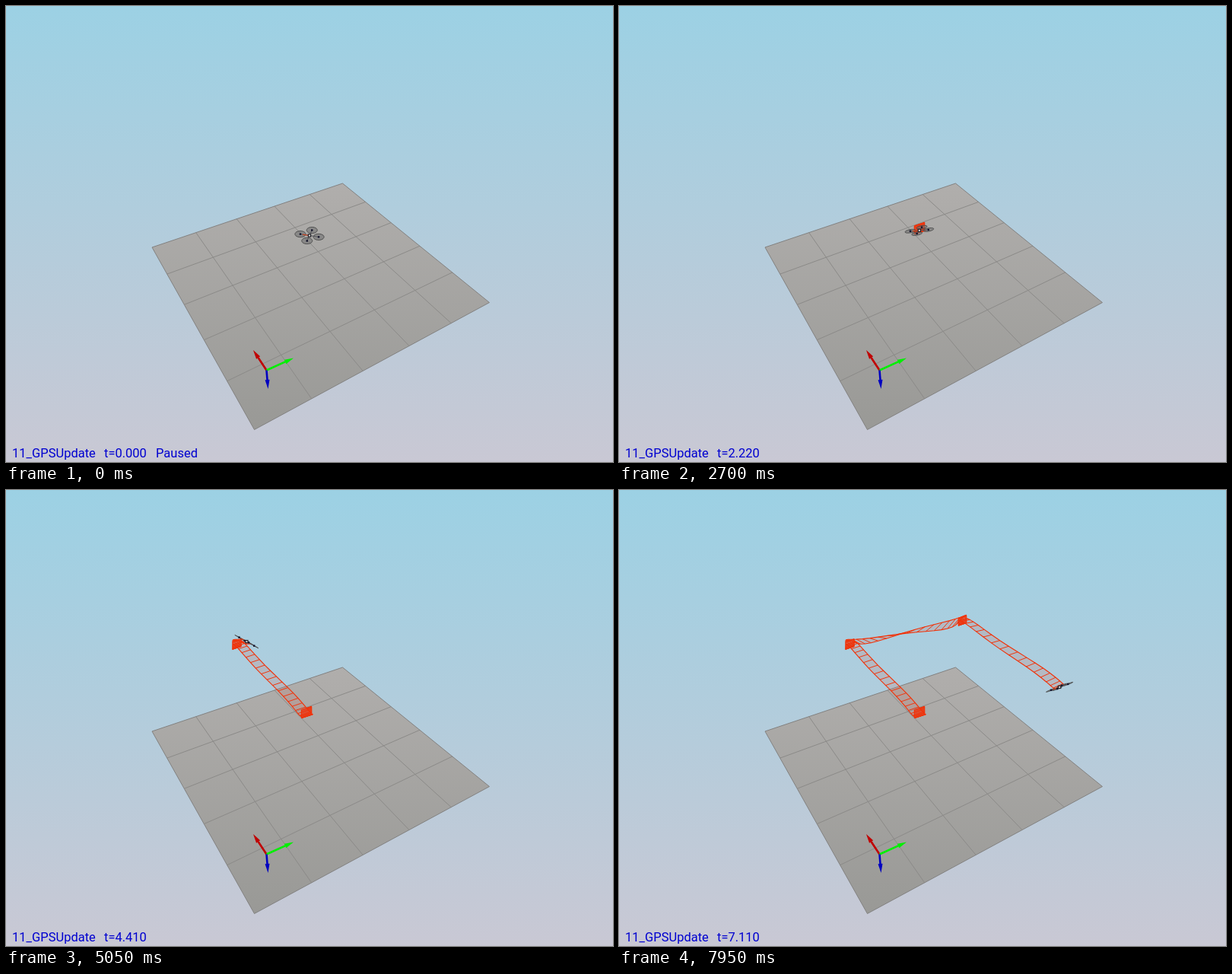
An HTML page with a canvas for the animation above (8 s loop, 798x599 px).

```html
<!DOCTYPE html>
<html lang="en">
<head>
<meta charset="utf-8">
<title>Quadrotor simulation</title>
<style>
html, body { margin: 0; width: 100%; height: 100%; overflow: hidden; }
canvas, svg { position: absolute; left: 0; top: 0; width: 798px; height: 599px; }
text { font: 400 16.5px Roboto, "Liberation Sans", sans-serif; fill: #0000d0; }
</style>
</head>
<body>
<canvas id="stage" width="798" height="599"></canvas>
<svg viewBox="0 0 798 599">
  <text x="8" y="593">11_GPSUpdate</text>
  <text x="129" y="593" id="clock">t=0.000</text>
  <text x="197" y="593" id="paused">Paused</text>
</svg>
<script>
const ctx = document.getElementById('stage').getContext('2d');
const clock = document.getElementById('clock');
const paused = document.getElementById('paused');

const LOOP = 8000, PAUSE = 300, SLOT = 50;
const RATE = 0.00093, TICK = 0.06, HALF_TICK_AT = 2850;
const TRAIL_START = 1.02, RUNG = 0.05;
const RED = '#f23006';

// Flight plan in simulated seconds; depth is the ground distance away from the camera
const home = { x: 398.5, y: 296 };
const legs = [
  { start: 0.56, time: 0.84, x: 394.5, y: 291, depth: 0 },
  { start: 2.16, time: 1.12, x: 303, y: 202, depth: 155 },
  { start: 4.16, time: 1.07, x: 451, y: 171, depth: 146 },
  { start: 6.20, time: 1.02, x: 580, y: 254.5, depth: -165 },
];
const BOB = 5, BOB_PERIOD = 1.186;
const LEAN = 0.0008;

const ease = s => s * s * s * (10 - 15 * s + 6 * s * s);
const easeAccel = s => 60 * s * (1 - s) * (1 - 2 * s);

// Screen position and both rotor arms; the body leans along its acceleration
function pose(t) {
  let { x, y } = home, leanX = 0, leanDepth = 0, hover = 1;
  for (const leg of legs) {
    const s = Math.min(1, Math.max(0, (t - leg.start) / leg.time));
    const p = ease(s), dx = leg.x - x, push = LEAN * easeAccel(s);
    if (s === 0) break;
    leanX += push * dx;
    leanDepth += push * leg.depth;
    x += dx * p;
    y += (leg.y - y) * p;
    hover = leg.depth ? 1 - 4 * p * (1 - p) : 1;
  }
  y += BOB * hover * Math.cos(2 * Math.PI * t / BOB_PERIOD);
  const scale = 0.82 + (y - 200) / 550;
  const arm = (right, away) => [
    scale * 12.4 * right,
    scale * (-7.2 * away + 10.1 * (right * leanX + away * leanDepth))];
  return { x, y, a: arm(-0.97, 0.26), b: arm(0.26, 0.97) };
}

function wing(t) {
  const { x, y, a, b } = pose(t);
  const hx = (b[0] - a[0]) * 0.45, hy = (b[1] - a[1]) * 0.45;
  return [[x - hx, y - hy], [x + hx, y + hy]];
}

// Perspective map from the unit square to the floor corners
const corners = [[326, 556], [635, 389], [442, 232.5], [191.5, 316.5]];
const floorPoint = (([x0, y0], [x1, y1], [x2, y2], [x3, y3]) => {
  const dx1 = x1 - x2, dx2 = x3 - x2, sx = x0 - x1 + x2 - x3;
  const dy1 = y1 - y2, dy2 = y3 - y2, sy = y0 - y1 + y2 - y3;
  const den = dx1 * dy2 - dy1 * dx2;
  const g = (sx * dy2 - sy * dx2) / den, h = (dx1 * sy - dy1 * sx) / den;
  return (u, v) => {
    const w = g * u + h * v + 1;
    return [((x1 - x0 + g * x1) * u + (x3 - x0 + h * x3) * v + x0) / w,
            ((y1 - y0 + g * y1) * u + (y3 - y0 + h * y3) * v + y0) / w];
  };
})(...corners);

function trace(points, close) {
  ctx.beginPath();
  points.forEach(p => ctx.lineTo(...p));
  if (close) ctx.closePath();
}

function fillShape(points, color) {
  trace(points, true);
  ctx.fillStyle = color;
  ctx.fill();
}

function line(points, color, width = 1) {
  trace(points);
  ctx.strokeStyle = color;
  ctx.lineWidth = width;
  ctx.stroke();
}

function dot(x, y, size, color) {
  ctx.fillStyle = color;
  ctx.fillRect(x - size / 2, y - size / 2, size, size);
}

function gradient(y0, y1, from, to) {
  const g = ctx.createLinearGradient(0, y0, 0, y1);
  g.addColorStop(0, from);
  g.addColorStop(1, to);
  return g;
}

function arrow(x, y, tipX, tipY, color) {
  const len = Math.hypot(tipX - x, tipY - y);
  const ux = (tipX - x) / len, uy = (tipY - y) / len;
  const bx = tipX - ux * 12, by = tipY - uy * 12;
  line([[x, y], [bx, by]], color, 2.6);
  fillShape([[tipX, tipY], [bx - uy * 3, by + ux * 3], [bx + uy * 3, by - ux * 3]], color);
}

function drawScene() {
  ctx.fillStyle = gradient(0, 599, '#9cd1e4', '#c9c8d4');
  ctx.fillRect(-1, -1, 800, 601);
  fillShape(corners, gradient(233, 556, '#b0aeac', '#999996'));
  for (let i = 0; i <= 5; i++) {
    const color = i % 5 ? '#8b8a88' : '#828180', s = i / 5;
    line([floorPoint(s, 0), floorPoint(s, 1)], color);
    line([floorPoint(0, s), floorPoint(1, s)], color);
  }
  arrow(342, 478, 324.5, 451.5, '#c00000');
  arrow(342, 478, 377.5, 462, '#00f000');
  arrow(342, 478, 344, 502.5, '#0000c0');
}

function drawTrail(now) {
  if (now <= TRAIL_START) return;
  const rungs = [];
  for (let t = TRAIL_START; t < now; t += RUNG) rungs.push(wing(t));
  rungs.push(wing(now));
  rungs.forEach(([left, right], i) => {
    if (i) fillShape([...rungs[i - 1], right, left], 'rgba(205,120,105,.22)');
    line([left, right], RED);
  });
  for (const side of [0, 1]) line(rungs.map(r => r[side]), RED, 1.1);
}

function drawDrone(now) {
  const { x, y, a, b } = pose(now);
  const at = (p, q) => [x + a[0] * p + b[0] * q, y + a[1] * p + b[1] * q];
  const rotors = [[0, 1], [1, 0], [-1, 0], [0, -1]];
  for (const [p, q] of rotors) {
    const rim = Array.from({ length: 25 }, (_, k) => {
      const angle = k * Math.PI / 12;
      return at(p + 0.56 * Math.cos(angle), q + 0.56 * Math.sin(angle));
    });
    fillShape(rim, 'rgba(115,115,115,.6)');
    line(rim, '#484848', 0.9);
  }
  line([at(-1, 0), at(1, 0)], '#55555b');
  line([at(0, -1), at(0, 1)], '#55555b');
  line([at(0, 0), at(0.75, 0)], '#c8401c', 1.2);
  for (const [p, q] of rotors) dot(...at(p, q), 2.4, '#15152c');
  dot(x, y, 4.4, '#26262c');
  dot(x, y, 2, '#d8d4d4');
}

// The simulation advances in whole ticks, shifted once by half a tick
function simTime(ms) {
  const shift = ms > HALF_TICK_AT ? TICK / 2 : 0;
  const t = Math.max(0, (ms - PAUSE) * RATE + 0.02);
  return Math.floor((t - shift) / TICK) * TICK + shift;
}

function render(elapsed) {
  const ms = Math.floor(elapsed % LOOP / SLOT) * SLOT;
  const now = simTime(ms);
  ctx.setTransform(1, 0, 0, 1, 0.5, 0.5);
  drawScene();
  drawTrail(now);
  drawDrone(now);
  clock.textContent = 't=' + now.toFixed(3);
  paused.style.display = ms < PAUSE ? '' : 'none';
}

const begin = performance.now();
function loop() {
  render(performance.now() - begin);
  requestAnimationFrame(loop);
}
loop();
</script>
</body>
</html>
```
